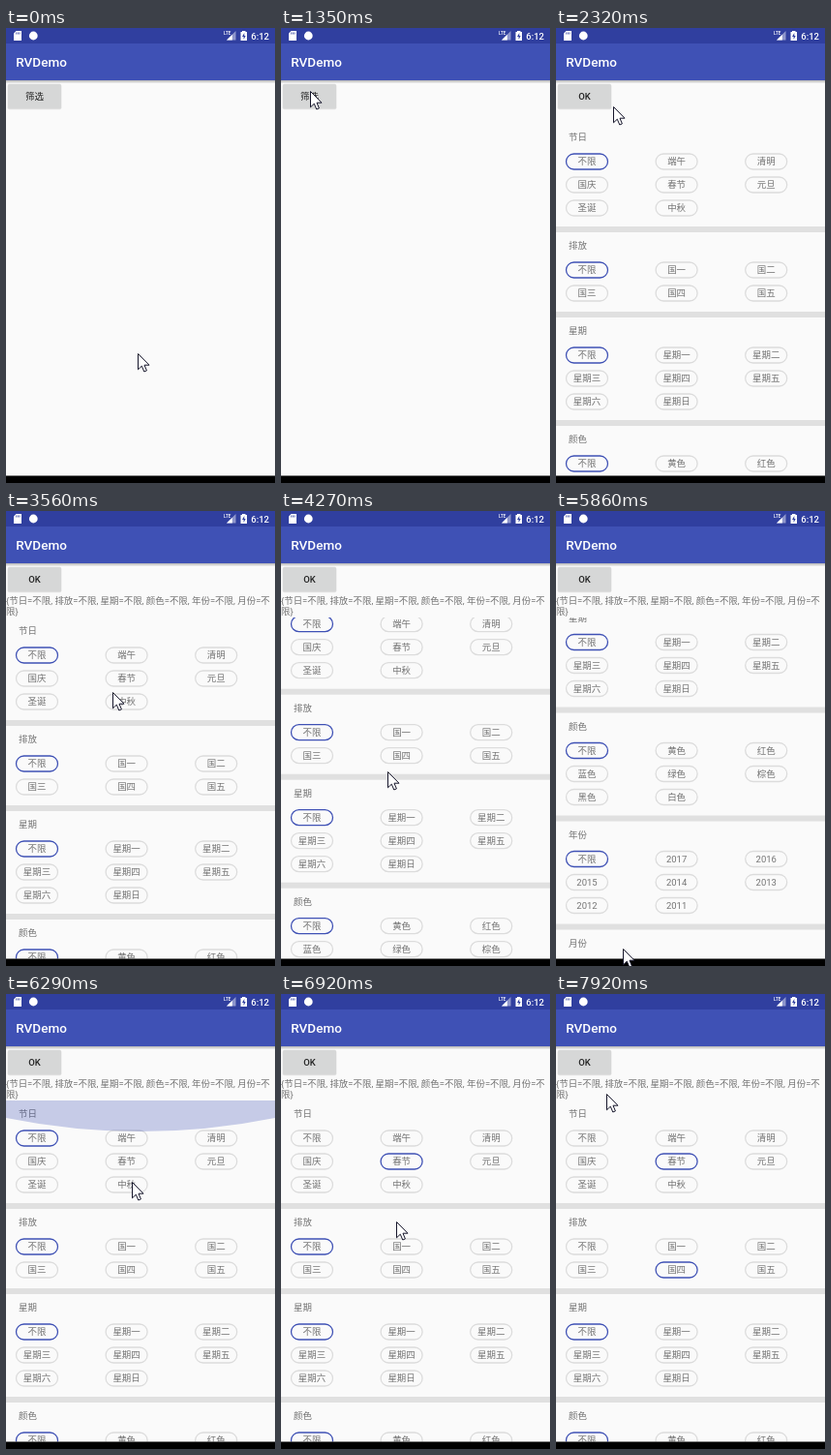
Write an HTML page that moves like this. It is 278 by 470 pixels and loops after 8000 ms.

```html
<!DOCTYPE html>
<html lang="zh-CN">
<head>
<meta charset="utf-8">
<title>RVDemo</title>
<style>
  html, body { margin: 0; width: 100%; height: 100%; overflow: hidden; background: #fafafa; }
  svg { display: block; }
  text { font: 9.46px Roboto, "Noto Sans CJK SC", "Noto Sans CJK", "Noto Sans CJK JP", sans-serif; fill: #737373; }
  .mid { text-anchor: middle; }
  .bar text { fill: #fff; font-weight: 500; }
  .chip rect { fill: none; stroke: #dcdcdc; stroke-width: 1.3; }
  .chip.on rect { stroke: #3f51b5; }
</style>
</head>
<body>
<svg id="stage" width="278" height="470" viewBox="0 0 278 470">
  <defs>
    <linearGradient id="shade" x2="0" y2="1">
      <stop offset="0" stop-color="#000" stop-opacity=".28"/>
      <stop offset="1" stop-color="#000" stop-opacity="0"/>
    </linearGradient>
  </defs>
  <rect width="278" height="470" fill="#fafafa"/>

  <svg id="view" width="278" overflow="hidden">
    <g id="list"></g>
    <path id="glow" fill="#3f51b5"/>
  </svg>

  <g id="summary">
    <text y="96.2">{节日=不限, 排放=不限, 星期=不限, 颜色=不限, 年份=不限, 月份=不</text>
    <text y="107">限}</text>
  </g>

  <rect x="1.6" y="58.4" width="55.8" height="25.8" rx="2" fill="#000" opacity=".1"/>
  <rect id="button" x="2" y="57.8" width="55" height="25.4" rx="1.5"/>
  <text id="label" class="mid" x="29.5" y="73.8" style="fill:#222;font-weight:500"></text>

  <g class="bar">
    <rect y="54" width="278" height="3.5" fill="url(#shade)"/>
    <rect y="16" width="278" height="38" fill="#3f51b5"/>
    <rect width="278" height="16" fill="#303f9f"/>
    <text x="10.3" y="40.2" style="font-size:13.5px">RVDemo</text>
    <path d="M10.5 3H16V13H8V5.5Z" fill="#fff"/>
    <path d="M10.7 4.5V6.5M12.4 4.5V6.5M14.1 4.5V6.5" stroke="#303f9f" stroke-width=".8"/>
    <circle cx="28.3" cy="8" r="4.4" fill="#fff"/>
    <path d="M237.5 3V12.5H228Z" fill="#8f97cc"/>
    <path d="M233.8 6.7V12.5H228Z" fill="#fff"/>
    <text x="225" y="6.8" style="font-size:4.6px">LTE</text>
    <path d="M244 3H247.5V4H249V13H242.5V4H244Z" fill="#fff"/>
    <path d="M246.3 5L244 9H245.6V12L247.7 8H246.3Z" fill="#303f9f"/>
    <text x="253.3" y="11.7">6:12</text>
  </g>
  <rect y="462.5" width="278" height="7.5" fill="#000"/>
  <path id="cursor" d="M.5 .5V16.8L4.3 13.2L6.8 19L9.4 17.9L7 12.2H12Z" fill="#fff" stroke="#15152a"/>
</svg>
<script>
const LOOP = 8000, BOTTOM = 462.5;
const OPEN = 1500, CONFIRM = 3000, PICK_FESTIVAL = 6600, PICK_EMISSION = 7470;
const $ = id => document.getElementById(id);

const sections = [
  ['节日', '不限 端午 清明 国庆 春节 元旦 圣诞 中秋'],
  ['排放', '不限 国一 国二 国三 国四 国五'],
  ['星期', '不限 星期一 星期二 星期三 星期四 星期五 星期六 星期日'],
  ['颜色', '不限 黄色 红色 蓝色 绿色 棕色 黑色 白色'],
  ['年份', '不限 2017 2016 2015 2014 2013 2012 2011'],
  ['月份', '不限 一月 二月 三月 四月 五月 六月 七月 八月 九月 十月 十一月 十二月']
];

// Turning points of each motion: [time, ...values], eased in between
const pointer = [
  [0, 136, 336], [120, 112, 317], [270, 112, 317], [1350, 30, 65], [OPEN, 30, 65], [1850, 58, 31],
  [2320, 59, 81], [CONFIRM, 36, 66], [3560, 110, 187], [3840, 112, 302], [4140, 112, 302],
  [4540, 104, 172], [5080, 93, 290], [5360, 80, 250], [5860, 69, 452], [6290, 130, 194],
  [PICK_FESTIVAL, 120, 172], [7190, 119, 283], [PICK_EMISSION, 119, 283], [7920, 52, 103]
];
const scrolling = [[4000, 0], [5080, 205.5], [5500, 320], [5860, 213.5], [6140, 0]];
const glowing = [[5990, 0], [6290, 1], [6890, 0]];

function track(keys, t) {
  const i = keys.findIndex(k => k[0] > t);
  if (i <= 0) return keys[i ? keys.length - 1 : 0].slice(1);
  const [t0, ...from] = keys[i - 1], [t1, ...to] = keys[i];
  const p = (t - t0) / (t1 - t0), eased = p * p * (3 - 2 * p);
  return from.map((v, n) => v + (to[n] - v) * eased);
}

function add(parent, tag, attrs, text) {
  const el = document.createElementNS('http://www.w3.org/2000/svg', tag);
  for (const k in attrs) el.setAttribute(k, attrs[k]);
  if (text) el.textContent = text;
  return parent.appendChild(el);
}

function buildList() {
  let top = 0;
  return sections.map(([title, names]) => {
    const items = names.split(' ');
    const height = 40 + 24 * Math.ceil(items.length / 3);
    add($('list'), 'text', { x: 13, y: top + 17 }, title);
    const chips = items.map((name, i) => {
      const x = 10.5 + 92.6 * (i % 3), y = top + 31 + 24 * Math.floor(i / 3);
      const g = add($('list'), 'g', { class: 'chip' });
      add(g, 'rect', { x, y, width: 43, height: 16, rx: 8 });
      add(g, 'text', { x: x + 21.5, y: y + 11.4, class: 'mid' }, name);
      return g;
    });
    add($('list'), 'rect', { y: top + height - 6, width: 278, height: 6, fill: '#e0e0e0' });
    top += height;
    return chips;
  });
}

const chips = buildList();
const show = (id, on) => $(id).setAttribute('visibility', on ? 'visible' : 'hidden');

function draw(t) {
  const opened = t >= OPEN, confirmed = t >= CONFIRM;
  const pressed = [OPEN, CONFIRM].some(c => Math.abs(t - c) < 120);
  const top = confirmed ? 110 : 99;
  const [x, y] = track(pointer, t);
  const [scroll] = track(scrolling, t);
  const [glow] = track(glowing, t);

  $('label').textContent = opened ? 'OK' : '筛选';
  $('button').setAttribute('fill', pressed ? '#c8c9c9' : '#d6d7d7');
  show('summary', confirmed);
  show('view', opened);
  $('view').setAttribute('y', top);
  $('view').setAttribute('height', BOTTOM - top);
  $('list').setAttribute('transform', `translate(0 ${-scroll})`);

  const picked = [t >= PICK_FESTIVAL ? 4 : 0, t >= PICK_EMISSION ? 4 : 0];
  chips.forEach((group, s) => group.forEach((g, i) => g.classList.toggle('on', i === (picked[s] || 0))));

  $('glow').setAttribute('d', `M0 0V${18 * glow}Q139 ${46 * glow} 278 ${18 * glow}V0Z`);
  $('glow').setAttribute('opacity', .28 * glow);
  $('cursor').setAttribute('transform', `translate(${Math.round(x)} ${Math.round(y)})`);
}

const start = performance.now();
function tick() {
  draw((performance.now() - start) % LOOP);
  requestAnimationFrame(tick);
}
tick();
</script>
</body>
</html>
```
